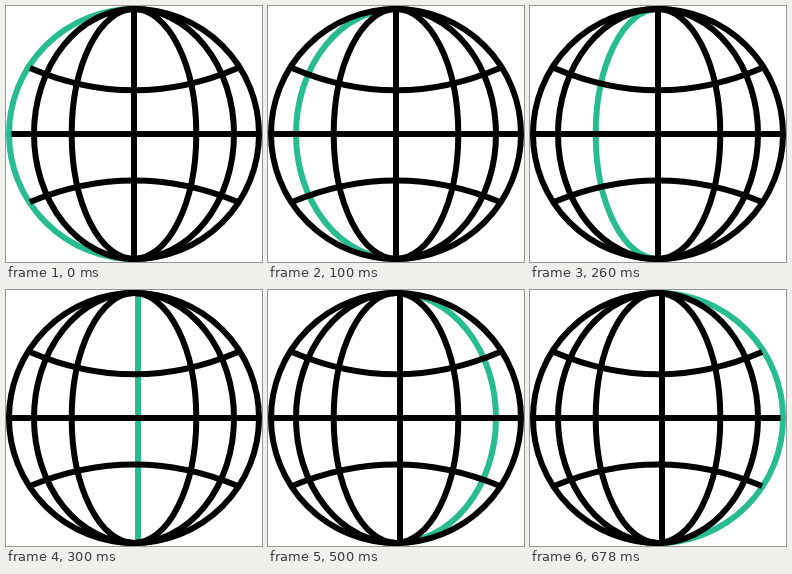
These frames come from a looping animation (256x256 px, 730 ms). An HTML page with a canvas:

```html
<!DOCTYPE html>
<html>
<head>
<meta charset="utf-8">
<style>
html, body { margin: 0; width: 100%; height: 100%; overflow: hidden; background: #fff; }
canvas { display: block; }
</style>
</head>
<body>
<canvas id="stage" width="256" height="256"></canvas>
<script>
const ctx = document.getElementById('stage').getContext('2d');
const STEP = 100, LOOP = 730, CENTER = 128, RADIUS = 125;
// Signed horizontal radii of the meridians, west to east.
const meridians = [-RADIUS, -100, -62.3, 0, 62.3, 100, RADIUS];

function stroke(color, path) {
  ctx.strokeStyle = color;
  ctx.beginPath();
  path();
  ctx.stroke();
}

function meridian(rx, axis, color) {
  stroke(color, () => {
    if (rx) {
      ctx.ellipse(CENTER, CENTER, Math.abs(rx), RADIUS, 0, -Math.PI / 2, Math.PI / 2, rx < 0);
    } else {
      ctx.moveTo(axis, CENTER - RADIUS);
      ctx.lineTo(axis, CENTER + RADIUS);
    }
  });
}

function parallel(edgeY, middleY) {
  stroke('#000', () => {
    ctx.moveTo(24, edgeY);
    ctx.quadraticCurveTo(CENTER, 2 * middleY - edgeY, 232, edgeY);
  });
}

function draw(time) {
  const active = Math.min(6, Math.floor(time % LOOP / STEP));
  const axis = active < 3 ? 128 : 132;
  ctx.fillStyle = '#fff';
  ctx.fillRect(0, 0, 256, 256);
  ctx.lineWidth = 6;

  meridian(meridians[active], axis, '#28bd91');
  meridians.forEach((rx, i) => {
    if (i !== active) meridian(rx, axis, '#000');
  });
  parallel(62, 84.3);
  parallel(196, 174.5);
  stroke('#000', () => {
    ctx.moveTo(5.5, CENTER);
    ctx.lineTo(250.5, CENTER);
  });
}

const start = performance.now();
function tick() {
  draw(performance.now() - start);
  requestAnimationFrame(tick);
}
tick();
</script>
</body>
</html>
```
